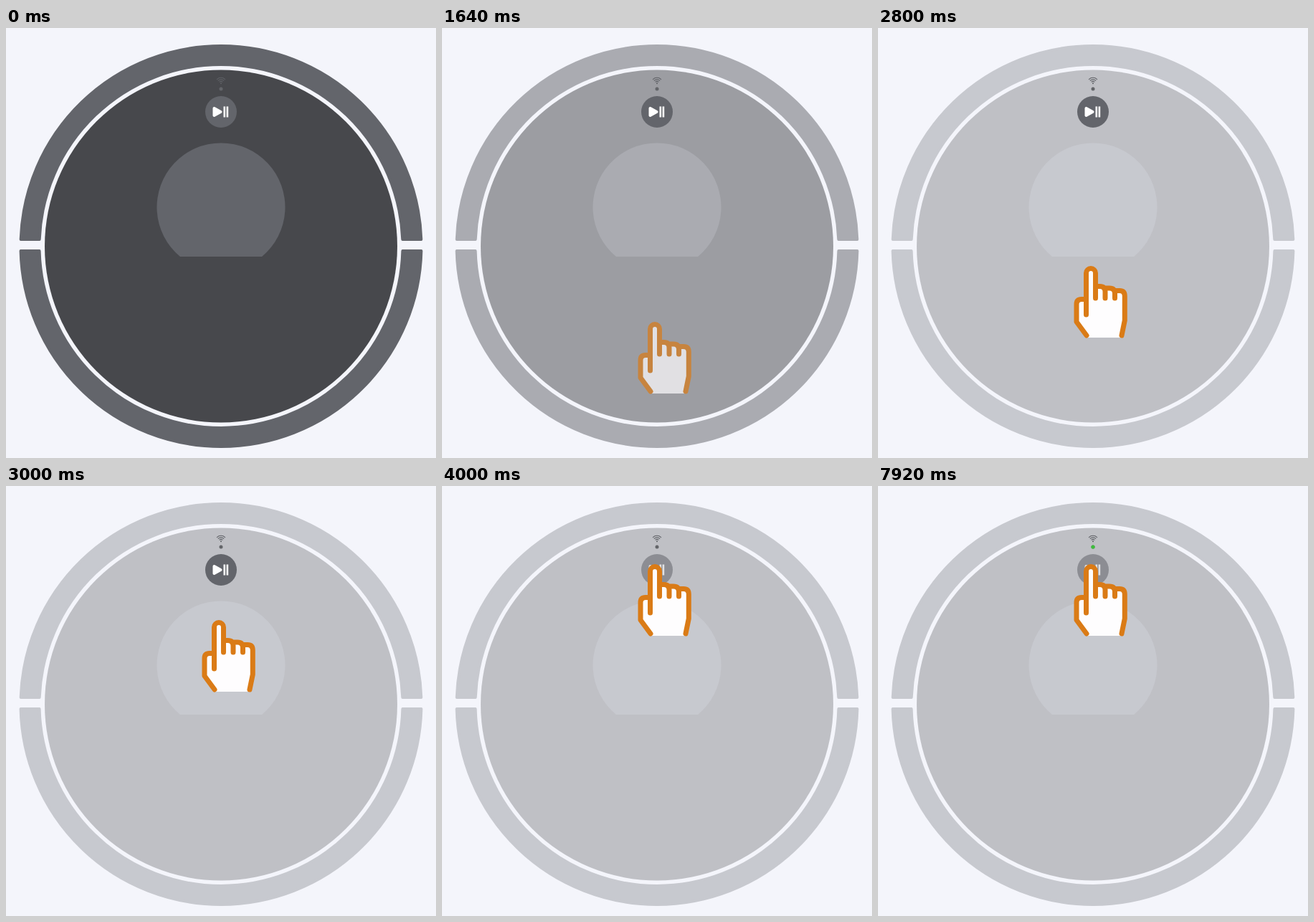
Animation of 600x600 px, one loop 8000 ms. Source, as an HTML page:

```html
<!DOCTYPE html>
<html lang="en">
<head>
<meta charset="utf-8">
<title>Robot vacuum: press and hold</title>
<style>
  html, body { margin: 0; width: 100%; height: 100%; overflow: hidden; background: #f4f5fb; }
  svg { display: block; width: 100vw; height: 100vh; }
</style>
</head>
<body>
<svg viewBox="0 0 600 600">
  <g id="robot" fill="#63656b">
    <path id="bumperTop" stroke="#63656b" stroke-width="4" stroke-linejoin="round"/>
    <path id="bumperBottom" stroke="#63656b" stroke-width="4" stroke-linejoin="round"/>
    <circle cx="300" cy="304.5" r="246" fill="#47484c"/>
    <path d="M243 319A89.5 89.5 0 1 1 357 319Z"/>
  </g>

  <g fill="none" stroke="#5f6166" stroke-width="1.1" stroke-linecap="round">
    <path d="M294.4 71.6a8 8 0 0 1 11.2 0M296.2 73.4a5.4 5.4 0 0 1 7.6 0M298 75.2a2.8 2.8 0 0 1 4 0"/>
    <circle cx="300" cy="77.2" r="1" fill="#5f6166" stroke="none"/>
  </g>
  <circle cx="300" cy="85" r="2.5" fill="#636569"/>
  <circle id="led" cx="300" cy="85" r="2.6" fill="#3dbe3c"/>

  <g id="button">
    <circle cx="300" cy="117" r="22" fill="#63656b"/>
    <path d="M290.5 112L299.5 117L290.5 122Z" fill="#fff" stroke="#fff" stroke-width="4" stroke-linejoin="round"/>
    <path d="M303.5 109.5h2.6v15h-2.6zM307.6 109.5h2.6v15h-2.6z" fill="#fff"/>
  </g>

  <g id="hand">
    <path fill="#fefdfe" d="M291 510L277 488V463.5Q277 456.5 284 456.5H290.5V420a6.5 6.5 0 0 1 13 0V438.5
      H309.5Q317 438.5 317 441H323Q330.5 441 330.5 444.5H337Q344.3 444.5 344.3 452V486L340 510Z"/>
    <path fill="none" stroke="#da7b16" stroke-width="7" stroke-linecap="round" stroke-linejoin="round" d="
      M291 507L277 488V463.5Q277 456.5 284 456.5H290.5
      M290.5 478V420a6.5 6.5 0 0 1 13 0V455
      M303.5 438.5H309.5Q317 438.5 317 446V455
      M317 441H323Q330.5 441 330.5 448.5V455
      M330.5 444.5H337Q344.3 444.5 344.3 452V486L340 507"/>
  </g>
</svg>
<script>
const LOOP = 8000, STEP = 40;
const $ = id => document.getElementById(id);

// Half ring around (300, 304.5), cut off at height y; side is -1 for the top half.
function halfRing(y, side) {
  const outer = 279.5, inner = 253.5;
  const dx = r => Math.sqrt(r * r - (y - 304.5) ** 2);
  const arc = (r, sweep, x) => `A${r} ${r} 0 0 ${sweep} ${x} ${y}`;
  const forward = side < 0 ? 1 : 0;
  return `M${300 - dx(outer)} ${y}` + arc(outer, forward, 300 + dx(outer)) +
    `L${300 + dx(inner)} ${y}` + arc(inner, 1 - forward, 300 - dx(inner)) + 'Z';
}
$('bumperTop').setAttribute('d', halfRing(295, -1));
$('bumperBottom').setAttribute('d', halfRing(311, 1));

function ease(t, start, end) {
  const p = Math.min(1, Math.max(0, (t - start) / (end - start)));
  return p * p * (3 - 2 * p);
}

function draw(now) {
  const t = Math.floor((now % LOOP) / STEP) * STEP;
  const reveal = ease(t, 1000, 2000);
  $('robot').setAttribute('opacity', 1 - 0.7 * reveal);
  $('hand').setAttribute('opacity', reveal);
  $('hand').setAttribute('transform', `translate(0 ${-301 * ease(t, 2600, 3200)})`);
  $('button').setAttribute('opacity', 1 - 0.45 * ease(t, 3200, 3440));
  const glow = t < 7000 ? 0 : 1 - ease(t, 7200, 7400) + ease(t, 7600, 7920);
  $('led').setAttribute('opacity', glow);
}

const start = performance.now();
function tick() {
  draw(performance.now() - start);
  requestAnimationFrame(tick);
}
tick();
</script>
</body>
</html>
```
